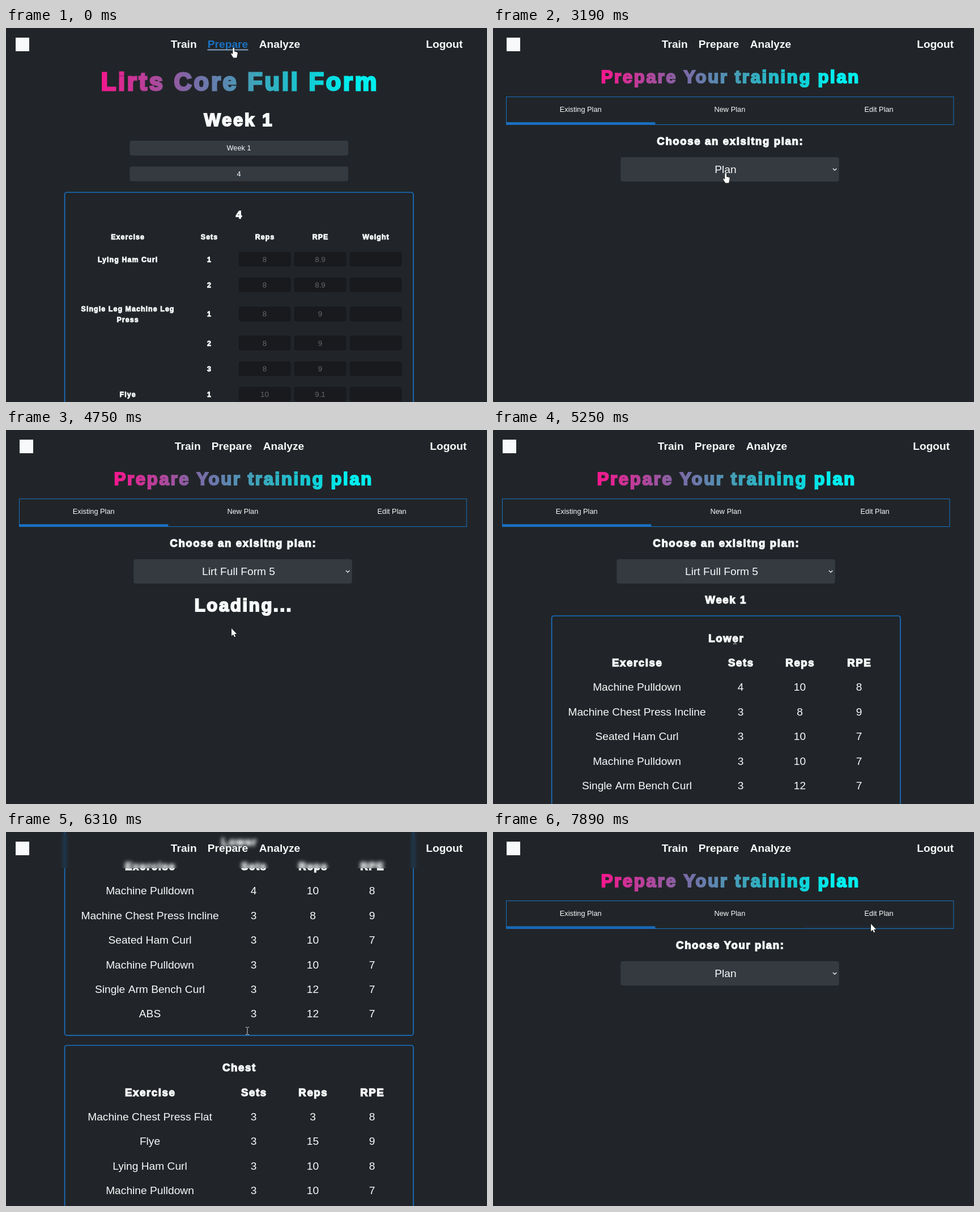
Animation of 849x660 px, one loop 8000 ms. Source, as an HTML page with a canvas:

```html
<!DOCTYPE html>
<html lang="en">
<head>
<meta charset="utf-8">
<title>Training planner</title>
<style>
  html, body { margin: 0; width: 100%; height: 100%; overflow: hidden; background: #212529; }
  canvas { display: block; }
</style>
</head>
<body>
<canvas id="stage" width="849" height="660"></canvas>
<script>
const canvas = document.getElementById('stage');
const ctx = canvas.getContext('2d');
const SANS = '"Liberation Sans", Arial, sans-serif';
const BG = '#212529', PANEL = '#343a40', BLUE = '#1971c2', WHITE = '#f8f9fa';
const LOOP = 8000, NAV_HEIGHT = 64, MID = 411, PLAN = 'Lirt Full Form 5';

// start ms, view, hovered link / highlighted row / scroll, cursor, x, y
const steps = [
  [0, 'workout', 1, 'hand', 397, 35],
  [1360, 'workout', 1, 'hand', 415, 35],
  [1630, 'workout', 2, 'hand', 474, 35],
  [2420, 'choose', 0, 'beam', 417, 95],
  [2670, 'choose', 0, 'arrow', 408, 164],
  [2940, 'choose', 0, 'beam', 411, 201],
  [3190, 'choose', 0, 'hand', 406, 256],
  [3450, 'open', 0, 'arrow', 411, 283],
  [3700, 'open', 2, 'arrow', 399, 354],
  [4240, 'open', 1, 'arrow', 379, 336],
  [4500, 'loading', 0, 'arrow', 379, 336],
  [4750, 'loading', 0, 'arrow', 398, 350],
  [5000, 'loaded', 0, 'arrow', 421, 363],
  [5250, 'loaded', 0, 'beam', 427, 371],
  [5520, 'loaded', 140, 'arrow', 427, 373],
  [5790, 'loaded', 246, 'arrow', 427, 373],
  [6040, 'loaded', 306, 'arrow', 427, 373],
  [6310, 'loaded', 350, 'beam', 426, 351],
  [6580, 'loaded', 0, 'beam', 426, 351],
  [6860, 'loaded', 0, 'arrow', 428, 129],
  [7110, 'loaded', 0, 'beam', 426, 108],
  [7390, 'loaded', 0, 'arrow', 556, 150],
  [7640, 'loaded', 0, 'arrow', 678, 165],
  [7890, 'edit', 0, 'arrow', 667, 162]
];

const cursors = {
  arrow: new Path2D('M0 0V13.5L3.1 10.7 5.1 15.3 7.2 14.4 5.2 10H9.3Z'),
  hand: new Path2D('M3.3 1.4a1.4 1.4 0 0 1 2.8 0V6.6L10.3 7.6Q12 8 11.8 9.8L11 14 10.2 17.5H4.2L.5 11.5Q-.3 9.5 1.3 9.5L3.3 11.3Z'),
  beam: new Path2D('M-3-6.5h2l1 1 1-1h2M0-5.5v11M-3 6.5h2l1-1 1 1h2')
};

// y is the middle of the capitals
function label(text, x, y, size = 12.8, color = WHITE, weight = '') {
  ctx.font = `${weight} ${size}px ${SANS}`;
  ctx.letterSpacing = '0px';
  ctx.fillStyle = color;
  ctx.fillText(text, x, y + size * 0.344);
}

function rainbow(width) {
  const fill = ctx.createLinearGradient(MID - width / 2, 0, MID + width / 2, 0);
  [[0, '#f7168d'], [0.33, '#7a6aa6'], [0.55, '#3fa2b9'], [0.75, '#13cad3'], [0.9, '#00eeee']]
    .forEach(([at, color]) => fill.addColorStop(at, color));
  return fill;
}

// Extra heavy, wide heading face
function heading(text, x, y, size = 19.2, colorful = false) {
  const spacing = size * 0.084;
  ctx.font = `bold ${size * 0.97}px ${SANS}`;
  ctx.letterSpacing = `${spacing}px`;
  ctx.fillStyle = ctx.strokeStyle = colorful ? rainbow(ctx.measureText(text).width) : WHITE;
  ctx.lineWidth = size * 0.068;
  ctx.miterLimit = 3;
  x += spacing / 2;
  y += size * 0.334;
  ctx.strokeText(text, x, y);
  ctx.fillText(text, x, y);
}

function box(x, y, w, h, color, radius = 4) {
  ctx.fillStyle = color;
  ctx.beginPath();
  ctx.roundRect(x, y, w, h, radius);
  ctx.fill();
}

function frame(y, h) {
  ctx.strokeStyle = BLUE;
  ctx.lineWidth = 1.7;
  ctx.beginPath();
  ctx.roundRect(103.6, y, 615.4, h, 4);
  ctx.stroke();
}

function drawNav(hover) {
  box(17, 17, 24, 24, WHITE, 0);
  [['Train', 313.7], ['Prepare', 391.5], ['Analyze', 483], ['Logout', 773.7]].forEach(([name, x], i) => {
    const active = i === hover;
    label(name, x, 28, 19.2, active ? BLUE : WHITE, 'bold');
    if (active) box(x - 36, 37.5, 72, 2, '#8aa4c0', 0);
  });
}

function drawWorkout() {
  heading('Lirts Core Full Form', MID, 95, 44.8, true);
  heading('Week 1', MID - 1.5, 162, 32);
  [['Week 1', 199], ['4', 244.5]].forEach(([value, y]) => {
    box(218.5, y, 385.5, 26, PANEL);
    label(value, MID, y + 13);
  });
  frame(290, 420);
  heading('4', MID, 329.5);

  const columns = [214.5, 358.5, 456.5, 554.5, 652.5];
  ['Exercise', 'Sets', 'Reps', 'RPE', 'Weight'].forEach((name, i) => heading(name, columns[i], 368.5, 12.8));
  const rows = [
    [408, 1, '8', '8.9'], [453.3, 2, '8', '8.9'],
    [504.7, 1, '8', '9'], [556, 2, '8', '9'], [601.2, 3, '8', '9'],
    [646.3, 1, '10', '9.1']
  ];
  for (const [y, set, ...targets] of rows) {
    heading(set, columns[1], y + 0.5, 12.8);
    for (let i = 0; i < 3; i++) {
      box(columns[i + 2] - 45.7, y - 13, 91.6, 26, '#181a1d');
      label(targets[i] || '', columns[i + 2], y, 13.33, '#65686b');
    }
  }
  [['Lying Ham Curl', 408.5], ['Single Leg Machine Leg', 495.5], ['Press', 514.5], ['Flye', 646.5]]
    .forEach(([name, y]) => heading(name, columns[0], y, 12.8));
}

function drawCard(top, title, rows) {
  const columns = [254, 437, 541.5, 646];
  frame(top, 84 + 43.4 * rows.length + 36.5);
  heading(title, MID, top + 39.5);
  ['Exercise', 'Sets', 'Reps', 'RPE'].forEach((name, i) => heading(name, columns[i], top + 82.7));
  rows.forEach((row, r) =>
    row.forEach((value, i) => label(value, columns[i], top + 125.7 + 43.4 * r, 19.2)));
}

function drawCards() {
  heading('Week 1', MID - 0.5, 300);
  drawCard(328, 'Lower', [
    ['Machine Pulldown', 4, 10, 8],
    ['Machine Chest Press Incline', 3, 8, 9],
    ['Seated Ham Curl', 3, 10, 7],
    ['Machine Pulldown', 3, 10, 7],
    ['Single Arm Bench Curl', 3, 12, 7],
    ['ABS', 3, 12, 7]
  ]);
  drawCard(726.5, 'Chest', [
    ['Machine Chest Press Flat', 3, 3, 8],
    ['Flye', 3, 15, 9],
    ['Lying Ham Curl', 3, 10, 8],
    ['Machine Pulldown', 3, 10, 7],
    ['Seated Ham Curl', 3, 12, 7],
    ['ABS', 3, 12, 7]
  ]);
}

function drawList(active) {
  box(218, 271, 386, 148, PANEL);
  ['Plan', PLAN, 'Upper Lower 4', 'Push Pull Legs 6'].forEach((name, i) => {
    const y = 273 + 35.4 * i;
    if (i === active) box(222, y, 377, 35.4, BLUE, 0);
    label(name, MID, y + 17.7, 19.2);
  });
}

function tabBar(index, alpha) {
  ctx.globalAlpha = alpha;
  box(16 + index * 263.4, 166.3, 263.4, 4.7, BLUE, 0);
  ctx.globalAlpha = 1;
}

function drawPlanner(view, row) {
  const picked = view === 'loading' || view === 'loaded';
  heading('Prepare Your training plan', MID, 86.5, 32, true);

  ctx.strokeStyle = BLUE;
  ctx.lineWidth = 1;
  ctx.strokeRect(16.5, 121.5, 789.5, 49);
  ['Existing Plan', 'New Plan', 'Edit Plan'].forEach((name, i) => label(name, 147.7 + 263.2 * i, 143.5));
  tabBar(0, view === 'edit' ? 0.9 : 1);
  if (view === 'edit') tabBar(2, 0.08);

  heading(view === 'edit' ? 'Choose Your plan:' : 'Choose an exisitng plan:', MID, 200);
  box(218.3, 228, 385.5, 43, PANEL);
  label(picked ? PLAN : 'Plan', 403.5, 249.5, 19.2);
  ctx.strokeStyle = WHITE;
  ctx.lineWidth = 1.3;
  ctx.stroke(new Path2D('M593 248l3.2 3.2 3.2-3.2'));

  if (view === 'open') drawList(row);
  if (view === 'loading') heading('Loading...', MID, 309.5, 32);
  if (view === 'loaded') drawCards();
}

function blurUnderNav() {
  ctx.save();
  ctx.beginPath();
  ctx.rect(0, 0, canvas.width, NAV_HEIGHT);
  ctx.clip();
  ctx.filter = 'blur(3px)';
  ctx.drawImage(canvas, 0, 0);
  ctx.restore();
}

function drawCursor(shape, x, y) {
  const path = cursors[shape];
  ctx.save();
  ctx.translate(x, y);
  ctx.lineWidth = 1;
  ctx.strokeStyle = shape === 'beam' ? '#d5d7d9' : '#000';
  ctx.stroke(path);
  ctx.fillStyle = '#fff';
  if (shape !== 'beam') ctx.fill(path);
  ctx.restore();
}

function render(now) {
  const time = now % LOOP;
  const [, view, detail, shape, x, y] = steps.findLast(step => step[0] <= time);
  const workout = view === 'workout';
  const scroll = view === 'loaded' ? detail : 0;
  // Short pages have no scrollbar, so their content is centred further right
  const shift = workout || view === 'loaded' ? 0 : 7;

  box(0, 0, canvas.width, canvas.height, BG, 0);
  ctx.textAlign = 'center';
  ctx.save();
  ctx.translate(shift, -scroll);
  if (workout) drawWorkout();
  else drawPlanner(view, detail);
  ctx.restore();
  if (scroll) blurUnderNav();

  ctx.save();
  ctx.translate(shift, 0);
  drawNav(workout ? detail : -1);
  ctx.restore();
  drawCursor(shape, x, y);
  requestAnimationFrame(render);
}
requestAnimationFrame(render);
</script>
</body>
</html>
```
